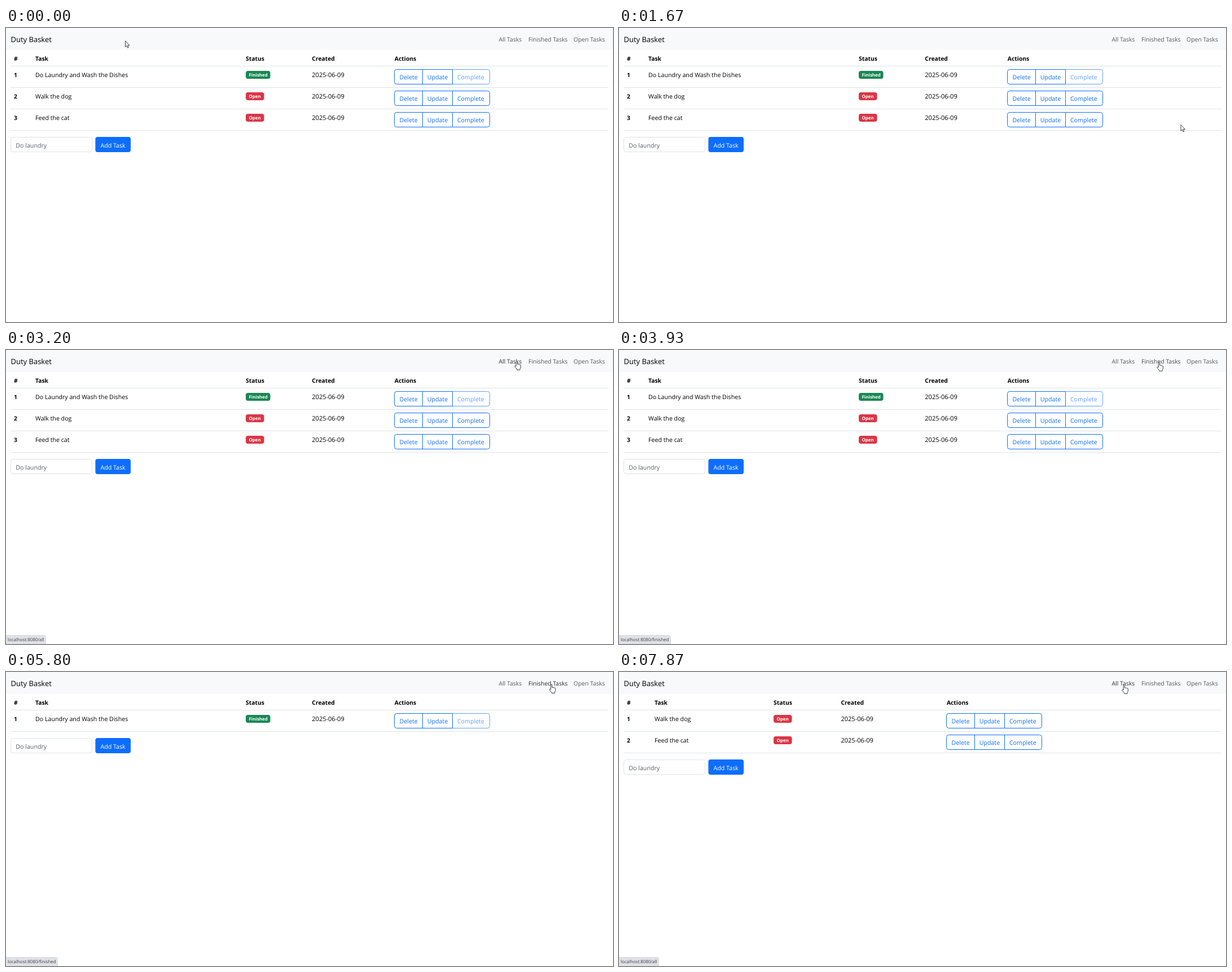
Recreate the animation shown at these times as an HTML page. Size 1076 px wide and 521 px high, loop 8 s.

```html
<!DOCTYPE html>
<html lang="en">
<head>
<meta charset="utf-8">
<title>Duty Basket</title>
<style>
  html, body { margin: 0; width: 100%; height: 100%; overflow: hidden; background: #fff; }
  svg { display: block; width: 100%; height: 100%; }
  text { font: 10.65px "Open Sans", "Noto Sans", sans-serif; fill: #000; text-rendering: geometricPrecision; white-space: pre; }
  .brand { font-size: 13px; }
  .nav { font-size: 10.45px; }
  .head { font-size: 10.35px; font-weight: 700; }
  .date { font-size: 11px; }
  .badge { font-size: 7.95px; font-weight: 700; fill: #fff; }
  .blue { fill: #0d6efd; }
  .white { fill: #fff; }
  .hint { fill: #595c5f; }
  .tip { font-size: 7.9px; fill: #3c4043; }
  .frame { fill: none; stroke: #0d6efd; }
  .line { stroke: #dee2e6; }
  .field { fill: #fff; stroke: #dee2e6; }
  .cursor { fill: #fff; stroke: #2a2a2a; stroke-width: .9; stroke-linejoin: round; }
</style>
</head>
<body>
<svg id="stage" viewBox="0 0 1076 521" preserveAspectRatio="none"></svg>
<script>
const NS = 'http://www.w3.org/2000/svg';
const LOOP = 8000, STEP = 1000 / 15, ROW = 38, TOP = 67.5;
const stage = document.getElementById('stage');

function add(parent, tag, attrs = {}, content = '') {
  const node = document.createElementNS(NS, tag);
  for (const key in attrs) node.setAttribute(key, attrs[key]);
  node.textContent = content;
  return parent.appendChild(node);
}
const label = (parent, x, y, str, cls = '') => add(parent, 'text', { x, y, class: cls }, str);
const box = (parent, x, y, width, height, attrs) => add(parent, 'rect', { x, y, width, height, ...attrs });
const rule = (parent, y) => add(parent, 'path', { d: `M8 ${y}H1068`, class: 'line' });

// Page
box(stage, 0, 0, 1076, 39, { fill: '#f8f9fa' });
label(stage, 8.5, 25, 'Duty Basket', 'brand');
const links = [[873.5, 'All Tasks'], [926, 'Finished Tasks'], [1006, 'Open Tasks']]
  .map(([x, str]) => label(stage, x, 24.3, str, 'nav'));

function actions(parent, x, y, done) {
  const g = add(parent, 'g', { transform: `translate(${x} ${y})` });
  const last = add(g, 'g', { opacity: done ? 0.65 : 1 });
  add(last, 'path', { class: 'frame', d: 'M103 0h62a4 4 0 0 1 4 4v18a4 4 0 0 1 -4 4h-62' });
  label(last, 111.4, 17.9, 'Complete', 'blue');
  add(g, 'path', { class: 'frame', d: 'M103 0H4a4 4 0 0 0 -4 4v18a4 4 0 0 0 4 4h99ZM50 0v26' });
  label(g, 9.1, 17.9, 'Delete', 'blue');
  label(g, 58.2, 17.9, 'Update', 'blue');
}

function buildView(cols, tasks) {
  const g = add(stage, 'g');
  ['#', 'Task', 'Status', 'Created', 'Actions'].forEach((str, i) => label(g, cols[i], 58, str, 'head'));
  rule(g, TOP);
  tasks.forEach(([name, done], i) => {
    const y = TOP + i * ROW;
    label(g, cols[0], y + 19.2, i + 1, 'head');
    label(g, cols[1], y + 19.2, name);
    box(g, cols[2], y + 8.5, done ? 43.5 : 32.5, 14, { rx: 4, fill: done ? '#198754' : '#dc3545' });
    label(g, cols[2] + 5.5, y + 18.7, done ? 'Finished' : 'Open', 'badge');
    label(g, cols[3], y + 19.2, '2025-06-09', 'date');
    actions(g, Math.floor(cols[4]) + .5, y + 6, done);
    rule(g, y + ROW);
  });
  const y = TOP + tasks.length * ROW + 12;
  box(g, 8.5, y, 144, 26, { rx: 4, class: 'field' });
  label(g, 17.3, y + 18.1, 'Do laundry', 'hint');
  box(g, 158.4, y - .5, 62.6, 27, { rx: 4, fill: '#0d6efd' });
  label(g, 167.5, y + 18.1, 'Add Task', 'white');
  return g;
}

const wide = [14, 52, 425, 542.3, 688.8];
const narrow = [14, 63, 274, 393.5, 580.9];
const laundry = ['Do Laundry and Wash the Dishes', true];
const pets = [['Walk the dog', false], ['Feed the cat', false]];
const views = [buildView(wide, [laundry, ...pets]), buildView(wide, [laundry]), buildView(narrow, pets)];

// Status bubble
const tip = add(stage, 'g');
const tipBox = add(tip, 'path', { fill: '#dee1e6', stroke: '#cfd2d8', 'stroke-width': .6 });
const tipText = label(tip, 3, 516.2, '', 'tip');

// Cursors
const cursors = {
  arrow: add(stage, 'path', { class: 'cursor', d: 'M.5 .8V11.6l2.4-2.2 1.7 3.8 1.7-.7-1.6-3.7h3.3Z' }),
  beam: add(stage, 'path', {
    fill: 'none', stroke: '#000',
    d: 'M-2.5-5.5H-1Q0-5.5 0-4.5Q0-5.5 1-5.5H2.5M0-5V5M-2.5 5.5H-1Q0 5.5 0 4.5Q0 5.5 1 5.5H2.5'
  }),
  hand: add(stage, 'path', {
    class: 'cursor',
    d: 'M3.2 10V1.7a1.1 1.1 0 0 1 2.2 0V6.2q1.1-.6 2 .3 1.1-.5 2 .4 1.7-.3 2 1.1V12l-1.3 2.5V16.3H4.8V15L1 10.7q-.6-1.3.5-1.7 1-.1 1.7 1Z'
  })
};

const clamp = v => Math.max(0, Math.min(1, v));
const smooth = p => p * p * (3 - 2 * p);

// The pointer roams along a spline, one knot per beat, then hops between links
const BEAT = 800 / 3;
const knots = [
  [211, 22], [640, 60], [560, 300], [118, 223.5], [20, 380], [600, 500],
  [1050, 150], [650, 350], [860, 150], [894, 19], [901, 19]
];
const hops = [
  { link: 0, from: 2400, to: 2600, x: 901, y: 19 },
  { link: 1, from: 3467, to: 3867, x: 953, y: 21 },
  { link: 2, from: 5690, to: 6200, x: 1033, y: 23 },
  { link: 0, from: 7467, to: 7730, x: 891, y: 22 }
];
const loads = [5400, 7000];

function roam(t) {
  const i = Math.floor(t / BEAT), p = t / BEAT - i;
  const knot = n => knots[Math.max(0, Math.min(knots.length - 1, n))];
  const [a, b, c, d] = [-1, 0, 1, 2].map(n => knot(i + n));
  return [0, 1].map(k => b[k] + p / 2 * (c[k] - a[k] + p * (2 * a[k] - 5 * b[k] + 4 * c[k] - d[k]
    + p * (3 * (b[k] - c[k]) + d[k] - a[k]))));
}

function pointer(t) {
  let [x, y] = roam(t);
  for (const hop of hops.slice(1)) {
    const p = smooth(clamp((t - hop.from) / (hop.to - hop.from)));
    x += (hop.x - x) * p;
    y += (hop.y - y) * p;
  }
  return [x, y];
}

function render(t) {
  const page = loads.filter(load => t > load + 60).length;
  views.forEach((view, i) => view.style.display = i === page ? '' : 'none');

  const glow = [0, 0, 0];
  hops.forEach(({ link, to }, i) => {
    const end = hops[i + 1] ? hops[i + 1].to - 200 : LOOP;
    glow[link] += clamp(Math.min((t - to) / 150, 1 - (t - end) / 150));
  });
  links.forEach((link, i) => link.setAttribute('fill-opacity', .65 + .17 * glow[i]));

  // The bubble fades in, and dips while a page loads
  const target = (hops.filter(hop => t >= hop.to).pop() || hops[0]).link;
  const dip = Math.min(...loads.map(load => Math.abs(t - load) / 200));
  tip.setAttribute('opacity', clamp((t - 2600) / 267) * clamp(dip + .03));
  tipText.textContent = 'localhost:8080/' + ['all', 'finished', 'open'][target];
  const width = tipText.getComputedTextLength() + 6;
  tipBox.setAttribute('d', `M-1 505.5H${width - 3}q3 0 3 3V522H-1Z`);

  const kind = t > 2500 ? 'hand' : Math.abs(t - 800) < 80 ? 'beam' : 'arrow';
  const [x, y] = pointer(t);
  for (const name in cursors) cursors[name].style.display = name === kind ? '' : 'none';
  cursors[kind].setAttribute('transform', `translate(${x} ${y})`);
}

// The screen refreshes fifteen times a second
let start;
function tick(now) {
  start ??= now;
  const t = (now - start) % LOOP;
  render(Math.floor((t + 4) / STEP) * STEP % LOOP);
  requestAnimationFrame(tick);
}
render(0);
requestAnimationFrame(tick);
</script>
</body>
</html>
```
